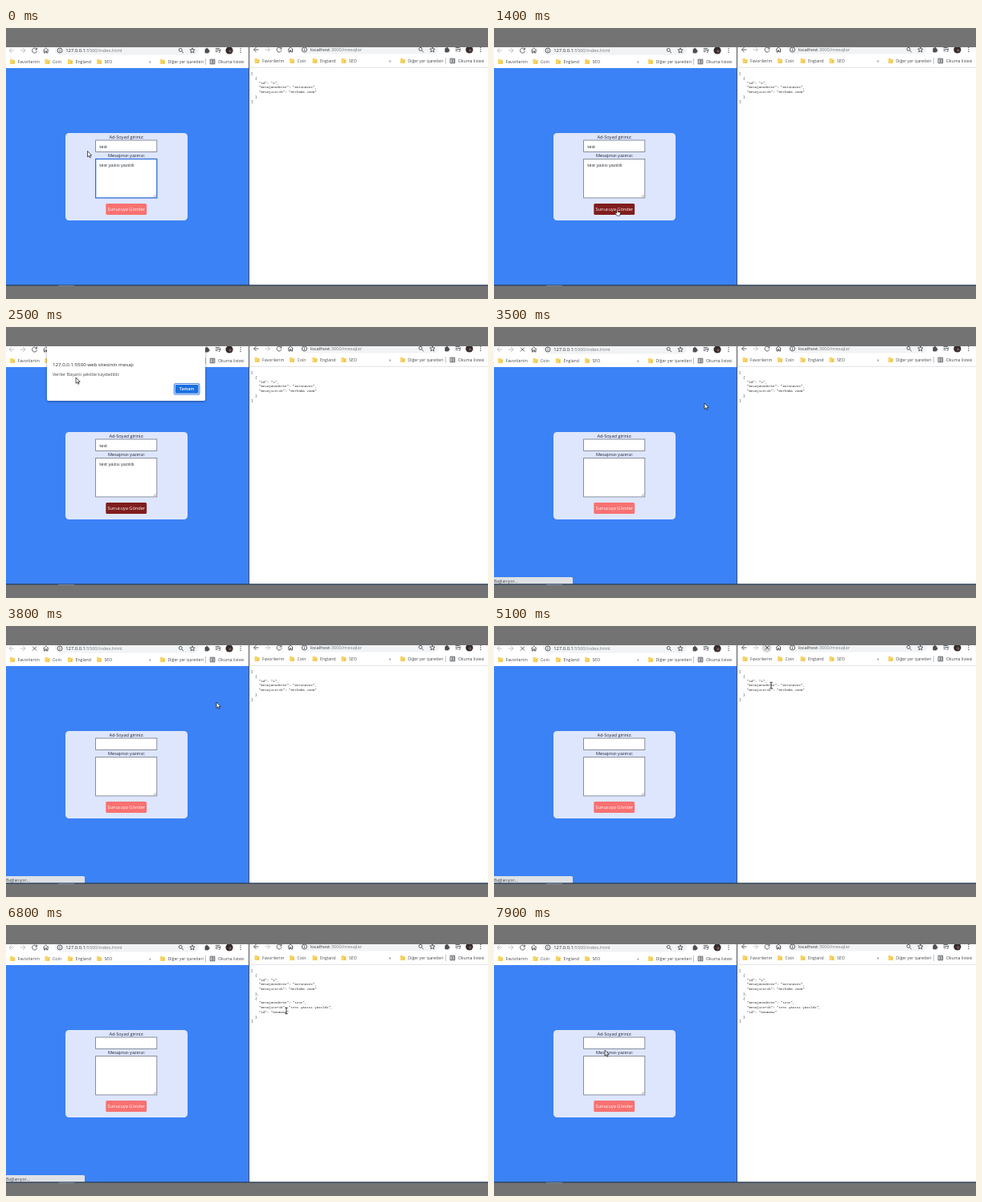
Recreate the animation shown at these times as an HTML page. Size 600 by 338 pixels, loop 8 s.

```html
<!DOCTYPE html>
<html lang="tr">
<head>
<meta charset="utf-8">
<style>
  html, body { margin: 0; width: 100%; height: 100%; overflow: hidden; background: #737373; }
  svg { display: block; width: 100vw; height: 100vh; }
  text { font: 5.2px "Open Sans", "Noto Sans", sans-serif; fill: #45484c; white-space: pre; }
  .url { font-size: 5.8px; fill: #303336; }
  .url tspan { fill: #777b80; }
  .form { font-size: 5.6px; fill: #20242c; }
  .json { font: 4.13px "Liberation Mono", monospace; fill: #222; }
  .mid { text-anchor: middle; }
  .icon { fill: none; stroke: #4b4f54; stroke-width: .9; }
  .pale { stroke: #b9bcc0; }
  .field { fill: #fff; stroke: #6f7788; stroke-width: .8; }
</style>
</head>
<body>
<svg viewBox="0 0 600 338" preserveAspectRatio="none">
  <defs>
    <clipPath id="screen"><rect y="24" width="600" height="298"/></clipPath>
    <filter id="shadow" x="-10%" y="-10%" width="120%" height="130%">
      <feDropShadow dx="0" dy="1" stdDeviation="1.5" flood-opacity=".4"/>
    </filter>
  </defs>
  <g clip-path="url(#screen)">
    <rect y="24" width="600" height="297" fill="#fff"/>
    <rect y="50" width="302" height="271" fill="#3b82f6"/>
    <g id="windows"></g>
    <path d="M303 49.3H600" stroke="#d9dbde" stroke-width=".8"/>

    <rect x="74" y="131" width="152" height="109" rx="4.5" fill="#dee6fd"/>
    <text class="form mid" x="150" y="137.7">Ad-Soyad giriniz:</text>
    <rect class="field" x="111.6" y="140" width="76.2" height="14.4"/>
    <text class="form mid" x="150" y="161.4">Mesajınızı yazınız:</text>
    <rect class="field" id="message" x="111.6" y="163.4" width="76.2" height="48.5"/>
    <path d="M183.7 210.8l3-3M185.4 210.8l1.3-1.3" class="icon" style="stroke-width:.5"/>
    <g id="entered">
      <text class="form" x="116.3" y="149.7">test</text>
      <text class="form" x="116.3" y="173">test yazısı yazıldı</text>
    </g>
    <rect id="send" x="124.3" y="219" width="50.8" height="14" rx="1.6"/>
    <text class="form mid" x="149.8" y="228" style="fill:#fff">Sunucuya Gönder</text>

    <g id="status">
      <path d="M0 312H96.5Q98 312 98 313.5V321H0Z" fill="#dee1e6"/>
      <text x="0" y="318.6">Bağlanıyor...</text>
    </g>
    <g id="json"></g>

    <g id="dialog">
      <path d="M51 20H248V89.5Q248 92 245.500 92H53.500Q51 92 51 89.500Z" transform="translate(0 0)" fill="#fff" filter="url(#shadow)"/>
      <text x="58" y="48.7" style="font-size:6.150px;fill:#25282c">127.0.0.1:5500 web sitesinin mesajı</text>
      <text x="58" y="61" style="font-size:5.4px">Veriler Başarılı şekilde kaydedildi:</text>
      <rect x="209.300" y="70.7" width="31.600" height="13.400" rx="2.200" fill="#fff" stroke="#5b93e8" stroke-width="1.200"/>
      <rect x="210.600" y="72" width="29" height="10.800" rx="1.300" fill="#1a6fe0"/>
      <text class="mid" x="225.100" y="79.300" style="fill:#fff;font-weight:600">Tamam</text>
    </g>
    <path d="M302.500 24V321" stroke="#4a4f57"/>
    <path d="M0 320.900H600" stroke="#263c58" stroke-width="1.200"/>
    <path d="M65 321.300H85" stroke="#7b8ea6"/>
    <g id="cursor">
      <path id="arrow" d="M0 0V7.300L1.700 5.800L2.800 8.300L4 7.800L2.900 5.400H5.100Z" fill="#fff" stroke="#111" stroke-width=".7"/>
      <path id="hand" d="M-.6 .5Q0-.4 .6 .5V3.200L3.300 3.900Q4 4.200 3.800 5L3.200 8.200H-.4L-2.500 5.200Q-2.300 4-.6 5Z" fill="#fff" stroke="#111" stroke-width=".6"/>
      <path id="beam" d="M-1.600-3.700H1.600M0-3.700V3.700M-1.600 3.700H1.600" fill="none" stroke="#222" stroke-width=".9"/>
    </g>
  </g>
</svg>
<script>
const LOOP = 8000, STEP = 100;
const $ = id => document.getElementById(id);
const show = (id, on) => $(id).setAttribute("visibility", on ? "visible" : "hidden");
const icon = (x, y, d, extra = "") => `<path class="icon ${extra}" transform="translate(${x} ${y})" d="${d}"/>`;
const label = (x, y, text, cls = "") => `<text class="${cls}" x="${x}" y="${y}">${text}</text>`;
const folder = (x, y) => `<path transform="translate(${x} ${y})" d="M-3-3H0L1-2H3V3H-3Z" fill="#f8d366"/>
  <path transform="translate(${x} ${y})" d="M1 3V0H3" fill="none" stroke="#d9ae3c" stroke-width=".5"/>`;

const BACK = "M3 0H-3M0-3L-3 0L0 3", FORWARD = "M-3 0H3M0-3L3 0L0 3";
const RELOAD = "M2.400-1.800A3 3 0 1 0 3 .6M3-3.300V-1H.7", STOP = "M-2.500-2.500L2.500 2.500M2.500-2.500L-2.500 2.500";
const HOME = "M-3.300 0L0-3L3.300 0M-2.300-.5V3H-.7V.8H.7V3H2.300V-.5";
const INFO = "M3 0A3 3 0 1 1-3 0A3 3 0 1 1 3 0M0-.4V1.700M0-1.700V-1";
const ZOOM = "M1.200-.6A2 2 0 1 1-2.800-.6A2 2 0 1 1 1.200-.6M.7 .9L3 3.200";
const STAR = "M0-3.200L.9-1L3.200-.9L1.400 .7L2 3L0 1.700L-2 3L-1.400 .7L-3.200-.9L-.9-1Z";
const PUZZLE = "M-2-1.500H-.8Q-1-3 0-3T.8-1.500H2V0Q3.300-.1 3.300 .9T2 1.700V3H-2Z";
const PLAYLIST = "M-3.300-2.500H2M-3.300-.5H2M-3.300 1.500H-.5M2.300-1V2.200M2.300-1H3.600M.7 2.300H2";
const READING = "M-2.800-2.800H2.800V2.800H-2.800ZM-1.400-1.200H1.700M-1.400 0H1.700M-1.400 1.200H1.700";

// Left-aligned parts shift by l, right-aligned parts by r, all rows by y.
function browserWindow(id, l, r, y, host, path, hasHistory) {
  const row = 28 + y, marks = 42 + y;
  return `<rect x="${61 + l}" y="${row - 7}" width="${179 + r - l}" height="12.500" rx="6.200" fill="#f1f3f4"/>`
    + `<circle id="${id}Hover" cx="${35 + l}" cy="${row}" r="6" fill="#d5d7da"/>`
    + icon(7 + l, row, BACK, hasHistory ? "" : "pale") + icon(21 + l, row, FORWARD, "pale")
    + `<g id="${id}Reload">${icon(35.500 + l, row, RELOAD)}</g><g id="${id}Stop">${icon(35.500 + l, row, STOP)}</g>`
    + icon(49.700 + l, row, HOME) + icon(67 + l, row, INFO)
    + label(74.300 + l, row + 2, `${host}<tspan>${path}</tspan>`, "url")
    + icon(218 + r, row, ZOOM) + icon(232 + r, row, STAR)
    + `<g style="--w:1">${icon(250 + r, row, PUZZLE).replace("<path", '<path style="fill:#4b4f54"')}</g>`
    + icon(264 + r, row, PLAYLIST)
    + `<circle cx="${278 + r}" cy="${row}" r="4.600" fill="#332c2c"/><circle cx="${279 + r}" cy="${row + 1}" r="1.800" fill="#70564f"/>`
    + [-2.500, 0, 2.500].map(d => `<circle cx="${292 + r}" cy="${row + d}" r=".7" fill="#4b4f54"/>`).join("")
    + [[8, "Favorilerim"], [51.500, "Coin"], [80, "England"], [116, "SEO"]]
      .map(([x, name]) => folder(x + l, marks) + label(x + 6.500 + l, marks + 1.800, name)).join("")
    + label(178 + r, marks + 1.800, "»") + folder(195 + r, marks)
    + label(201.500 + r, marks + 1.800, "Diğer yer işaretleri")
    + icon(248.500 + r, marks, "M0-4V4", "pale") + icon(257 + r, marks, READING)
    + label(264 + r, marks + 1.800, "Okuma listesi");
}
$("windows").innerHTML =
  browserWindow("left", 0, 0, 0, "127.0.0.1", ":5500/index.html", false)
  + browserWindow("right", 304.500, 298.800, -1, "localhost", ":3000/mesajlar", true);

const first = ["[", "  {", '    "id": "1",', '    "mesajGonderen": "Dorunavex",', '    "mesajicerik": "Merhaba JSON"'];
const before = [...first, "  }", "]"];
const after = [...first, "  },", "  {", '    "mesajGonderen": "test",',
  '    "mesajicerik": "test yazısı yazıldı",', '    "id": "OoaEZSU"', "  }", "]"];
const listing = (id, lines) => `<g id="${id}">`
  + lines.map((line, i) => label(305, 58.300 + i * 5.720, line, "json")).join("") + "</g>";
$("json").innerHTML = listing("before", before) + listing("after", after);

// Pointer stops: time, x, y
const path = [
  [0, 101.500, 153.500], [200, 101.500, 153.500], [1000, 145, 164], [1200, 153.500, 226], [1700, 153.500, 226],
  [2400, 87, 63], [2600, 87, 63], [3000, 225, 76], [3200, 225, 76], [3500, 262, 95], [3800, 262, 95],
  [4300, 343, 30], [4500, 340, 25], [4700, 340, 25], [5100, 345, 74], [6100, 345, 82],
  [6600, 349, 107], [7100, 349, 107], [7800, 138, 156], [8000, 138, 156]
];
function pointerAt(t) {
  const i = path.findIndex(p => p[0] > t);
  const [t0, x0, y0] = path[i - 1], [t1, x1, y1] = path[i];
  const k = (t - t0) / (t1 - t0), e = k * k * (3 - 2 * k);
  return [x0 + (x1 - x0) * e, y0 + (y1 - y0) * e];
}

function render(t) {
  const during = (from, to) => t >= from && t < to;
  const [x, y] = pointerAt(t);
  const inside = (l, top, r, b) => x > l && x < r && y > top && y < b;
  const onButton = inside(124, 219, 175, 233);
  const onText = inside(111, 163, 188, 212) || inside(303, 52, 410, 122);
  $("cursor").setAttribute("transform", `translate(${x} ${y})`);
  show("hand", onButton);
  show("beam", onText);
  show("arrow", !onButton && !onText);

  const focused = t < 1200;
  $("message").style.stroke = focused ? "#2f6fd6" : "#6f7788";
  $("message").style.strokeWidth = focused ? 1.300 : .8;
  $("send").setAttribute("fill", during(1200, 3100) ? "#7f1d1d" : "#f87171");
  show("dialog", during(1800, 3100));
  show("entered", t < 3500);
  show("status", during(3500, 7400));

  const leftBusy = during(3500, 6300), rightBusy = during(4600, 6300);
  show("leftStop", leftBusy);
  show("leftReload", !leftBusy);
  show("leftHover", false);
  show("rightStop", rightBusy);
  show("rightReload", !rightBusy);
  show("rightHover", during(4400, 6300));
  show("before", t < 6300);
  show("after", t >= 6300);
}

function frame() {
  render(Math.floor(performance.now() % LOOP / STEP) * STEP);
  requestAnimationFrame(frame);
}
frame();
</script>
</body>
</html>
```
